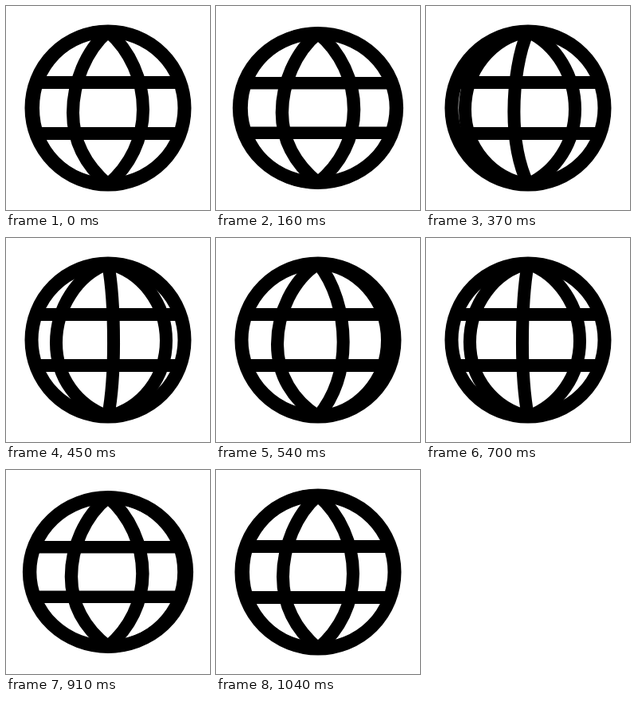
Write an HTML page that moves like this. It is 256 by 256 pixels and loops after 1160 ms.

```html
<!DOCTYPE html>
<html lang="en">
<head>
<meta charset="utf-8">
<title>Spinning globe</title>
<style>
  html, body { margin: 0; width: 100%; height: 100%; overflow: hidden; background: #fff; }
  svg { display: block; width: 100vw; height: 100vh; }
</style>
</head>
<body>
<svg viewBox="0 0 256 256">
  <g id="globe" fill="none" stroke="#000" stroke-width="16">
    <circle r="96" stroke-width="17"/>
    <path d="M-91-32H91M-91 32H91"/>
    <path class="meridian"/>
    <path class="meridian"/>
    <path class="meridian"/>
  </g>
</svg>
<script>
  const LOOP = 1160;   // ms
  const STEPS = 28;    // steps per loop, 24 per second
  const START = 5;     // step at which the spin begins
  const SPEED = 0.14;  // meridian gaps per step at full speed
  const RAMP = 26 / 7; // steps needed to reach full speed

  // Meridian poses from the left rim to the right rim:
  // widest point x and y, pole handle x and y, side handle length
  const POSES = [
    [-94, 0, -53, 0, 53],
    [-44, 6, -28, 24, 37],
    [44, 2, 28, 24, 37],
    [94, 0, 53, 0, 53]
  ];

  const globe = document.getElementById('globe');
  const meridians = [...document.querySelectorAll('.meridian')];

  const mix = (a, b, u) => a.map((v, i) => v + (b[i] - v) * u);

  // Steps last 40 or 50 ms, since their times are cut to 10 ms
  const stepAt = ms => Math.ceil((Math.floor(ms / 10) + 1) * 6 / 25) - 1;

  function spinUp(step) {
    const d = Math.max(0, step - START);
    return SPEED * (d < RAMP ? d * d / (2 * RAMP) : d - RAMP / 2);
  }

  // The second half mirrors the first
  const spinAt = step => step <= STEPS / 2 ? spinUp(step) : 2 - spinUp(STEPS - step);

  function squashAt(step) {
    const fromEdge = Math.min(step, STEPS - step);
    return 0.05 * Math.max(0, 1 - Math.abs(fromEdge - START) / 2);
  }

  function meridianPath([x, y, px, py, h]) {
    return `M0-96C${px} ${py - 96} ${x} ${y - h} ${x} ${y}S${px} ${96 - py} 0 96`;
  }

  function draw(ms) {
    const step = stepAt(ms % LOOP);
    const squash = squashAt(step);
    const turn = spinAt(step) % 1;
    globe.setAttribute('transform', `translate(128 128) scale(${1 + squash} ${1 - squash})`);
    meridians.forEach((m, i) => {
      m.setAttribute('d', meridianPath(mix(POSES[i], POSES[i + 1], turn)));
    });
  }

  const begin = performance.now();
  function tick() {
    draw(performance.now() - begin);
    requestAnimationFrame(tick);
  }
  tick();
</script>
</body>
</html>
```
